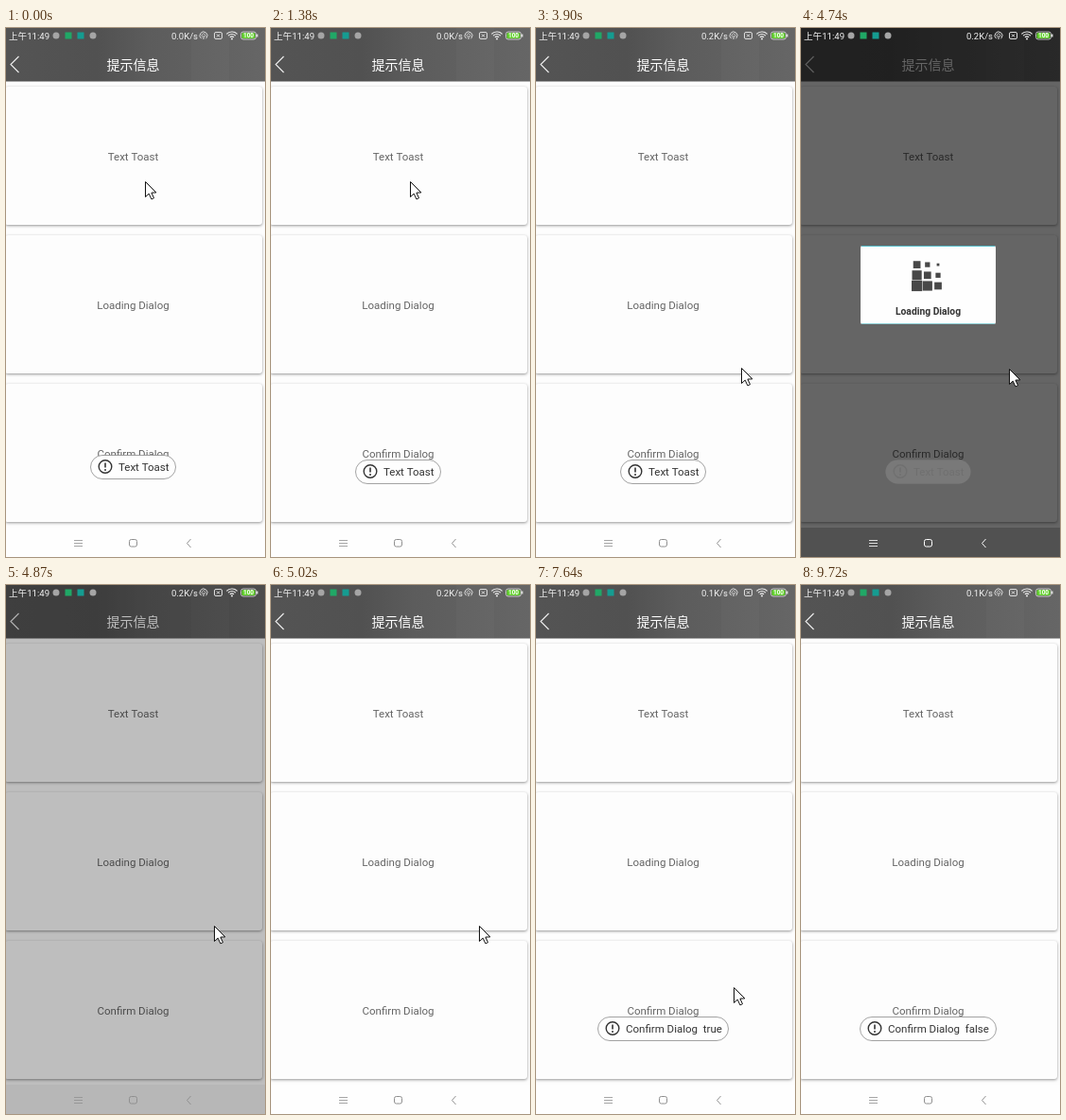
Recreate the animation shown at these times as an HTML page with a canvas. Size 274 by 559 pixels, loop 9.82 s.

```html
<!DOCTYPE html>
<html lang="zh">
<head>
<meta charset="utf-8">
<style>
html, body { margin: 0; width: 100%; height: 100%; overflow: hidden; background: #fff; }
canvas { display: block; width: 274px; height: 559px; }
</style>
</head>
<body>
<canvas id="stage" width="274" height="559"></canvas>
<script>
const ctx = document.getElementById('stage').getContext('2d');
const LOOP = 9820, MID = 134.5, TEXT = 11.5;
const FONT = 'Roboto, "Noto Sans CJK SC", "Noto Sans CJK", sans-serif';

const cursorPath = [
  [0, 147, 162], [3100, 147, 162], [3780, 217, 359], [4050, 217, 359], [4330, 220, 360],
  [5140, 220, 360], [5650, 209, 447], [6000, 209, 447], [6350, 172, 296], [6700, 172, 296],
  [7260, 209, 425], [8180, 209, 425], [8450, 95, 296], [8700, 95, 296], [9130, 140, 562], [LOOP, 140, 562]
];
const toasts = [
  { from: -150, to: 460, text: 'Text Toast', x: 89, w: 91 },
  { from: 790, to: 1380, text: 'Text Toast', x: 89, w: 91 },
  { from: 1900, to: 2720, text: 'Text Toast', x: 89, w: 91 },
  { from: 3000, to: 4480, text: 'Text Toast', x: 89, w: 91 },
  { from: 6950, to: 8180, text: 'Confirm Dialog  true', x: 65, w: 139 },
  { from: 8820, to: LOOP, text: 'Confirm Dialog  false', x: 62, w: 145 }
];
const dimSteps = [[0, 0], [4190, .3], [4330, .6], [4870, .25], [5020, 0]];
const speedSteps = [[0, '0.0K/s'], [1900, '0.2K/s'], [6400, '0.1K/s']];

const valueAt = (steps, t) => steps.filter(s => s[0] <= t).pop()[1];

function positionAt(path, t) {
  const i = Math.max(1, path.findIndex(p => p[0] > t));
  const [a, b] = [path[i - 1], path[i]];
  const u = (t - a[0]) / (b[0] - a[0]);
  const k = u * u * (3 - 2 * u);
  return [a[1] + (b[1] - a[1]) * k, a[2] + (b[2] - a[2]) * k];
}

function rect(x, y, w, h, color) {
  ctx.fillStyle = color;
  ctx.fillRect(x, y, w, h);
}

function rounded(x, y, w, h, r) {
  ctx.beginPath();
  ctx.roundRect(x, y, w, h, r);
}

function disc(x, y, r, color) {
  ctx.fillStyle = color;
  ctx.beginPath();
  ctx.arc(x, y, r, 0, 7);
  ctx.fill();
}

function line(points, color, width = 1) {
  ctx.strokeStyle = color;
  ctx.lineWidth = width;
  ctx.beginPath();
  points.forEach(p => ctx.lineTo(...p));
  ctx.stroke();
}

function arc(x, y, r, a, b, color, width = 1) {
  ctx.strokeStyle = color;
  ctx.lineWidth = width;
  ctx.beginPath();
  ctx.arc(x, y, r, a, b);
  ctx.stroke();
}

function label(text, x, y, size, color, align = 'left', weight = 400) {
  ctx.font = `${weight} ${size}px ${FONT}`;
  ctx.fillStyle = color;
  ctx.textAlign = align;
  ctx.fillText(text, x, y);
}

function drawHeader() {
  const g = ctx.createLinearGradient(0, 0, 274, 0);
  g.addColorStop(0, '#545454');
  g.addColorStop(.35, '#515151');
  g.addColorStop(.55, '#5c5c5c');
  g.addColorStop(1, '#666');
  rect(0, 0, 274, 56.5, g);
  rect(196, 0, 40, 56, 'rgba(255,255,255,.02)');
  line([[13.5, 30], [5, 38.5], [13.5, 47]], '#eee', 1.1);
  label('提示信息', MID, 44, 14, '#fff', 'center');
}

function drawCard(y, text) {
  ctx.save();
  ctx.shadowColor = 'rgba(0,0,0,.42)';
  ctx.shadowBlur = 3;
  ctx.shadowOffsetY = 1;
  ctx.fillStyle = '#fdfdfd';
  rounded(-1, y, 272, 146, 3);
  ctx.fill();
  ctx.restore();
  label(text, MID, y + 77.5, TEXT, '#646464', 'center');
}

function drawNav(color) {
  for (const y of [541.5, 544.5, 547.5]) line([[72, y], [81, y]], color, .8);
  ctx.lineWidth = 1;
  rounded(130.5, 540.5, 8, 7.5, 2);
  ctx.stroke();
  line([[195.5, 540], [191.5, 544.5], [195.5, 549]], color);
}

function drawStatus(speed) {
  label('上午11:49', 3, 11.5, 9.6, '#f2f2f2');
  disc(53, 8, 3.5, '#a5a5a5');
  rect(62.5, 4.5, 7, 7, '#20a866');
  rect(75.5, 4.5, 7, 7, '#159c91');
  disc(92, 8, 3.5, '#a5a5a5');
  label(speed, 175, 11.5, 9.5, '#f2f2f2');
  arc(209, 8, 4, 2.2, 7.2, '#ddd');
  arc(209, 8, 2, 2.2, 7.2, '#ddd', .8);
  line([[209, 8], [209, 12]], '#ddd');
  ctx.strokeStyle = '#ddd';
  rounded(220.5, 4.5, 8, 7, 1.5);
  ctx.stroke();
  line([[223, 6.5], [226, 9.5]], '#ddd');
  line([[226, 6.5], [223, 9.5]], '#ddd');
  for (const r of [3, 5.5, 8]) arc(239, 12, r, -2.36, -.78, '#eee', 1.2);
  disc(239, 11.5, 1, '#eee');
  ctx.strokeStyle = '#ddd';
  ctx.lineWidth = .8;
  rounded(248.5, 4, 16, 8, 2.5);
  ctx.stroke();
  ctx.fillStyle = '#63d22d';
  rounded(249.5, 5, 14, 6, 1.5);
  ctx.fill();
  rect(265, 6.5, 1.5, 3, '#ddd');
  label('100', 256.5, 10.4, 6.5, '#fff', 'center', 700);
}

function drawToast({ text, x, w }, y, alpha) {
  ctx.save();
  ctx.globalAlpha = alpha;
  ctx.fillStyle = '#fefefe';
  ctx.strokeStyle = '#8c8c8c';
  ctx.lineWidth = .8;
  rounded(x + .5, y + .5, w - 1, 25, 12.5);
  ctx.fill();
  ctx.stroke();
  arc(x + 16, y + 12.5, 6.8, 0, 7, '#333', 1.4);
  line([[x + 16, y + 8.5], [x + 16, y + 13.5]], '#333', 1.6);
  disc(x + 16, y + 16, 1, '#333');
  label(text, x + 30, y + 17, TEXT, '#333');
  ctx.restore();
}

function drawToasts(t) {
  for (const toast of toasts) {
    const age = t - toast.from;
    const alpha = t < toast.to ? 1 : 1 - (t - toast.to) / 300;
    if (age < 0 || alpha <= 0) continue;
    const shift = age < 150 ? 15 : age < 310 ? -5 : 0;
    drawToast(toast, 456 + shift, alpha * (age < 150 ? .6 : 1));
  }
}

function drawPanel() {
  ctx.fillStyle = '#fefefe';
  rounded(63, 230, 143, 83, 2);
  ctx.fill();
  rect(64, 230, 141, 1, '#55bcc8');
  rect(64, 312, 141, 1, '#8fd0d6');
}

// Nine squares shrink and regrow, delayed along the diagonals.
function drawLoading(t) {
  drawPanel();
  const time = 969 + Math.floor((t - 4740) / 130) * 130;
  const cell = 11.2;
  for (let row = 0; row < 3; row++) {
    for (let col = 0; col < 3; col++) {
      const p = ((time - (2 - row + col) * 100 + 2600) % 1300) / 1300;
      const size = cell * Math.min(1, Math.abs(p / .35 - 1));
      const inset = (cell - size) / 2;
      rect(117 + col * cell + inset, 244.5 + row * cell + inset, size, size, '#484848');
    }
  }
  label('Loading Dialog', MID, 303, 10.3, '#333', 'center', 700);
}

function drawConfirm() {
  drawPanel();
  label('Confirm Dialog', MID, 262, TEXT, '#333', 'center');
  line([[63, 285.5], [206, 285.5]], '#ddd');
  line([[134.5, 285.5], [134.5, 312]], '#ddd');
  label('取消', 99, 303, 11, '#666', 'center');
  label('确定', 170, 303, 11, '#333', 'center');
}

function drawCursor(x, y) {
  ctx.save();
  ctx.translate(x + .5, y + .5);
  ctx.beginPath();
  [[0, 0], [0, 16], [3.7, 12.6], [6.4, 18.4], [9, 17.2], [6.4, 11.6], [11.4, 11.4]].forEach(p => ctx.lineTo(...p));
  ctx.closePath();
  ctx.fillStyle = '#fff';
  ctx.strokeStyle = '#111';
  ctx.lineWidth = 1;
  ctx.fill();
  ctx.stroke();
  ctx.restore();
}

function draw(t) {
  const dim = valueAt(dimSteps, t);
  rect(0, 0, 274, 559, '#fdfdfd');
  drawHeader();
  ['Text Toast', 'Loading Dialog', 'Confirm Dialog'].forEach((text, i) => drawCard(62 + i * 157, text));
  rect(0, 528, 274, 31, '#fefefe');
  if (dim) {
    rect(0, 0, 274, 528, `rgba(0,0,0,${dim})`);
    rect(0, 528, 274, 31, `rgba(0,0,0,${dim * 1.13})`);
  }
  drawNav(dim > .4 ? '#fff' : '#909090');
  drawStatus(valueAt(speedSteps, t));
  if (t >= 4190 && t < 4870) drawLoading(t);
  if ((t >= 6000 && t < 6700) || (t >= 8180 && t < 8700)) drawConfirm();
  drawToasts(t);
  drawCursor(...positionAt(cursorPath, t));
}

function tick() {
  draw(performance.now() % LOOP);
  requestAnimationFrame(tick);
}
tick();
</script>
</body>
</html>
```
